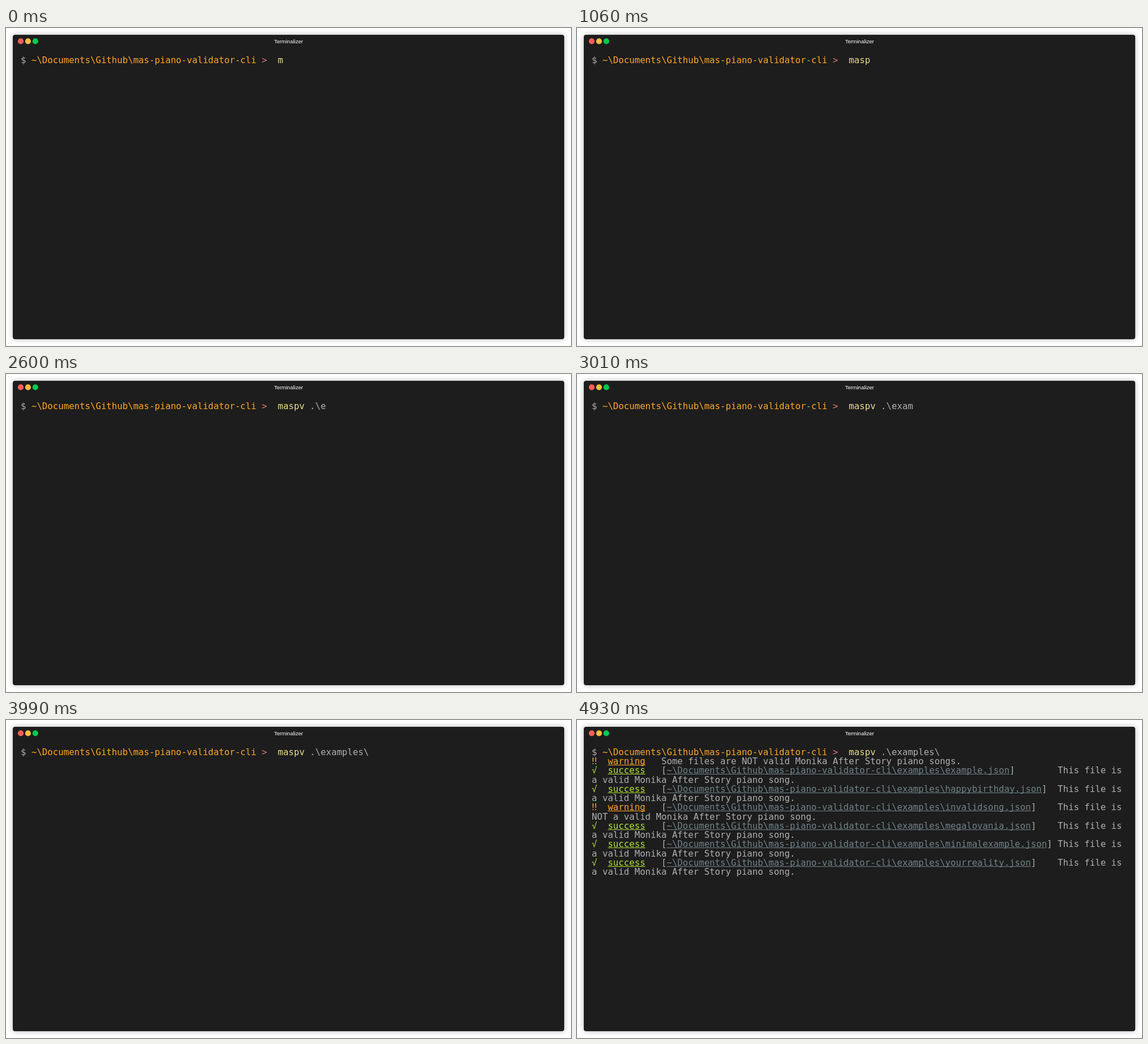
An HTML page with a canvas for the animation above (4.96 s loop, 998 by 561 pixels).

```html
<!DOCTYPE html>
<html lang="en">
<head>
<meta charset="utf-8">
<title>Terminal</title>
<style>
  html, body { margin: 0; width: 100%; height: 100%; overflow: hidden; background: #fff; }
  canvas { display: block; }
</style>
</head>
<body>
<canvas id="stage" width="998" height="561"></canvas>
<script>
const ctx = document.getElementById('stage').getContext('2d');

const LOOP = 4960;
const CELL = { x: 26, y: 62, w: 9.46, h: 16.23 };
const COLOR = {
  text: '#afafaf', yellow: '#ffa727', green: '#b3e33b',
  path: '#708387', command: '#ebdf86', arrow: '#e2777a'
};
const DIR = '~\\Documents\\Github\\mas-piano-validator-cli';
const COMMAND = 'maspv';
const TYPED = COMMAND + ' .\\examples\\';

// [time in ms, number of typed characters visible from then on]
const KEYS = [
  [0, 1], [130, 2], [220, 3], [1060, 4], [1310, 5], [2030, 7], [2190, 8],
  [2600, 9], [2820, 10], [2915, 11], [3010, 12], [3200, 13], [3265, 14],
  [3330, 15], [3580, 16], [3990, 17]
];
const SUMMARY_AT = 4900;
const RESULTS_AT = 4930;

const RESULTS = [
  ['example', true], ['happybirthday', true], ['invalidsong', false],
  ['megalovania', true], ['minimalexample', true], ['yourreality', true]
];

function print(str, col, row, color, underlined = false) {
  const y = Math.round(CELL.y + row * CELL.h);
  const x = CELL.x + col * CELL.w;
  ctx.fillStyle = color;
  [...str].forEach((char, i) => ctx.fillText(char, x + i * CELL.w, y));
  if (underlined) ctx.fillRect(x, y + 1, str.length * CELL.w, 1);
}

function drawWindow() {
  ctx.fillStyle = '#fff';
  ctx.fillRect(0, 0, 998, 561);

  ctx.save();
  ctx.shadowColor = 'rgba(0, 0, 0, 0.3)';
  ctx.shadowBlur = 10;
  ctx.fillStyle = '#1d1d1d';
  ctx.beginPath();
  ctx.roundRect(12, 12, 974, 537, 4);
  ctx.fill();
  ctx.restore();

  ['#ff5f58', '#ffbd44', '#00ca4e'].forEach((color, i) => {
    ctx.fillStyle = color;
    ctx.beginPath();
    ctx.arc(26 + i * 12.9, 23.4, 5.1, 0, Math.PI * 2);
    ctx.fill();
  });

  ctx.font = '9.5px "Liberation Sans", Arial, sans-serif';
  ctx.textAlign = 'center';
  ctx.fillStyle = '#fff';
  ctx.fillText('Terminalizer', 499, 27);
}

function drawPrompt(time) {
  const count = KEYS.filter(([at]) => at <= time).pop()[1];
  const typed = TYPED.slice(0, count);
  print('$', 0, 0, COLOR.text);
  print(DIR, 2, 0, COLOR.yellow);
  print('>', 45, 0, COLOR.arrow);
  print(typed.slice(0, COMMAND.length), 48, 0, COLOR.command);
  print(typed.slice(COMMAND.length), 48 + COMMAND.length, 0, COLOR.text);
}

function printLabel(row, ok) {
  const color = ok ? COLOR.green : COLOR.yellow;
  print(ok ? '√' : '‼', 0, row, color);
  print(ok ? 'success' : 'warning', 3, row, color, true);
}

function drawSummary() {
  printLabel(1, false);
  print('Some files are NOT valid Monika After Story piano songs.', 13, 1, COLOR.text);
}

function drawResults() {
  RESULTS.forEach(([name, ok], i) => {
    const row = 2 + i * 2;
    const path = `${DIR}\\examples\\${name}.json`;
    printLabel(row, ok);
    print('[', 13, row, COLOR.text);
    print(path, 14, row, COLOR.path, true);
    print(']', 14 + path.length, row, COLOR.text);
    print('This file is', 87, row, COLOR.text);
    print(`${ok ? '' : 'NOT '}a valid Monika After Story piano song.`, 0, row + 1, COLOR.text);
  });
}

function render(now) {
  const time = now % LOOP;
  drawWindow();
  ctx.font = '15.72px "DejaVu Sans Mono", monospace';
  ctx.textAlign = 'left';
  drawPrompt(time);
  if (time >= SUMMARY_AT) drawSummary();
  if (time >= RESULTS_AT) drawResults();
}

const start = performance.now();
function tick() {
  render(performance.now() - start);
  requestAnimationFrame(tick);
}
tick();
</script>
</body>
</html>
```
